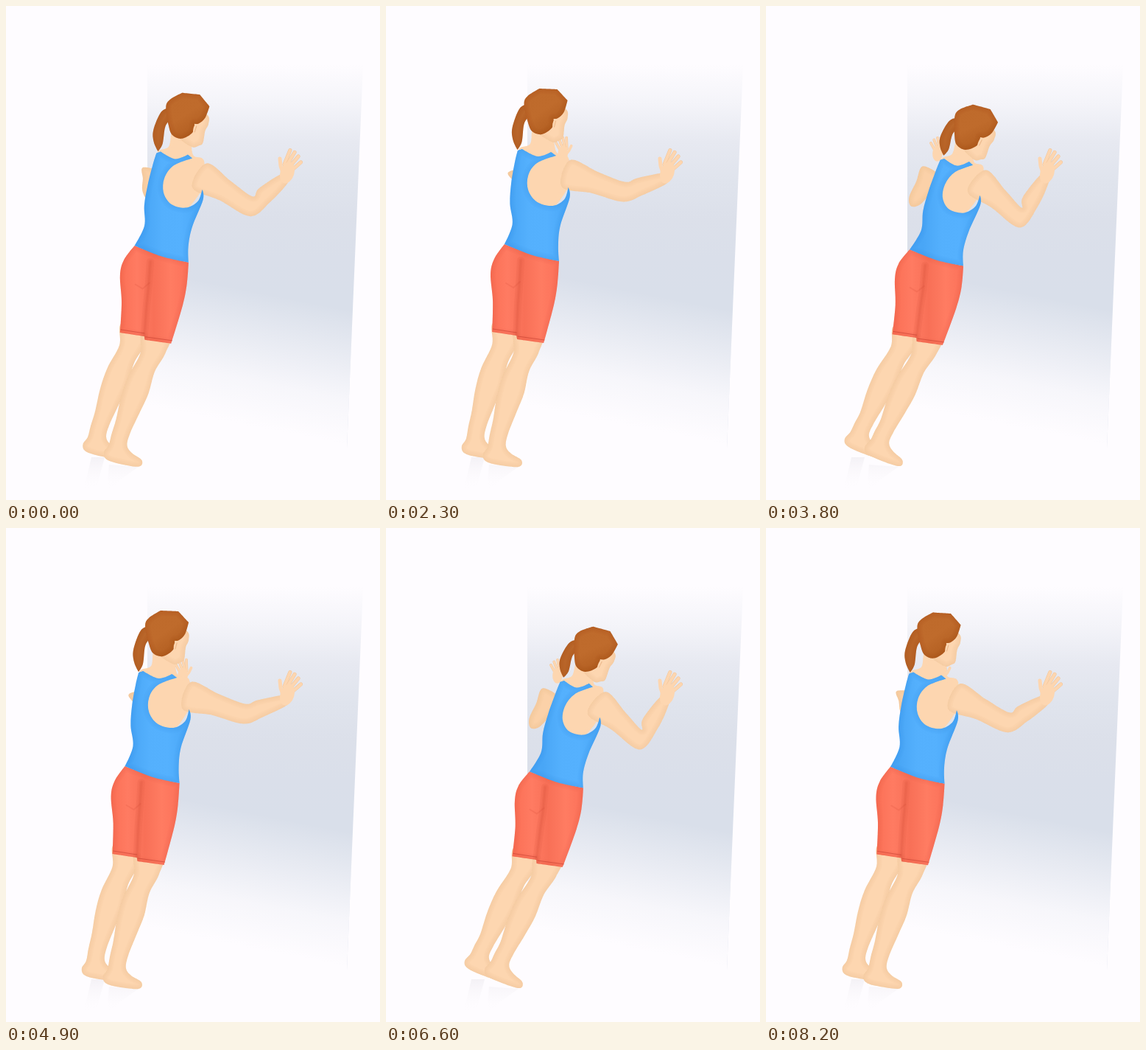
Write an HTML page with a canvas that moves like this. It is 508 by 670 pixels and loops after 8300 ms.

```html
<!DOCTYPE html>
<html lang="en">
<head>
<meta charset="utf-8">
<title>Wall push-up</title>
<style>
html, body { margin: 0; width: 100%; height: 100%; overflow: hidden; background: #fefcff; }
canvas { display: block; }
</style>
</head>
<body>
<canvas id="stage" width="508" height="670"></canvas>
<script>
const ctx = document.getElementById('stage').getContext('2d');
const LOOP = 8300, STEP = 100, CYCLE = LOOP / 3;
const SKIN = '#fdd6b0', SKIN_SHADE = '#d99a68', HAIR_SHADE = '#8d430d';

const clamp = v => Math.min(1, Math.max(0, v));
const mix = (a, b, t) => a + (b - a) * t;

// One push-up as [ms, lean]: 0 = arms extended, 1 = closest to the wall.
const KEYS = [[-417, -.04], [-100, .24], [0, .42], [233, .64], [1050, 1], [1500, .56], [1800, .14], [2350, -.04]];

function leanAt(time) {
  const start = KEYS[0][0], phase = (time - start) % CYCLE + start;
  let i = 0;
  while (i < KEYS.length - 2 && phase > KEYS[i + 1][0]) i++;
  const slope = k => {
    const a = KEYS[k - 1], b = KEYS[k + 1];
    return a && b ? (b[1] - a[1]) / (b[0] - a[0]) : 0;
  };
  const [t0, v0] = KEYS[i], [t1, v1] = KEYS[i + 1];
  const d = t1 - t0, s = clamp((phase - t0) / d), r = 1 - s;
  return v0 * r * r * (1 + 2 * s) + v1 * s * s * (3 - 2 * s)
    + d * s * r * (slope(i) * r - slope(i + 1) * s);
}

// How far the body travels at full lean, by height: [y, dx, dy].
const TRAVEL = [[110, 66, 20], [195, 54, 13], [330, 32, 7], [370, 32, 6], [450, 26, 3], [625, 0, 0]];

const drop = u => Math.max(0, u) ** 1.5;

// Moves a point of the upright pose to where the lean takes it.
function leaning(u) {
  return ({ x, y, corner }) => {
    let i = 0;
    while (i < TRAVEL.length - 2 && y > TRAVEL[i + 1][0]) i++;
    const [y0, x0, d0] = TRAVEL[i], [y1, x1, d1] = TRAVEL[i + 1];
    const s = clamp((y - y0) / (y1 - y0));
    const lag = .2 * u * (1 - u) * clamp((y - 250) / 100);
    const turn = .12 * (x - 195) * clamp((300 - y) / 80);
    return { x: x + (mix(x0, x1, s) - turn) * (u - lag), y: y + mix(d0, d1, s) * drop(u), corner };
  };
}

// Outline of the upright pose as "x,y" points; "!" marks a corner.
const shape = text => text.split(' ').map(p => {
  const [x, y] = p.split(',');
  return { x: +x, y: parseFloat(y), corner: y.endsWith('!') };
});

const LEG = shape('176,440 174,470 159,502 151,530 146,560 141,582 138,598 132,608 135,617 150,622 180,625 184,616 170,607 163,597 166,580 178,550 188,525 195,495 208,470 215,440');
const SHORTS = shape('162,323! 200,337 236,346! 234,375 229,405 215,457! 179,452! 178,447! 145,442! 146,400 143,364 148,343');
const TANK = shape('181,196! 177,212 172,240 170,268 173,296 162,323! 200,338 236,346! 235,325 238,298 251,260 249,246! 244,262 228,271 207,266 195,250 195,230 207,213 233,203! 226,198! 208,204 187,194!');
const TORSO = shape('203,165 198,187 182,196 190,230 193,256 225,275 249,246! 250,207 234,199 227,178');
const FACE = shape('206,165 227,184 238,182 243,178 245,162 249,152 247,140 225,130');
const HAIR = shape('190,133 195,122 211,112! 235,113! 249,128! 244,144 236,152 230,153! 228,165 214,174 201,170 195,157');
const PONYTAIL = shape('197,134 184,139 174,165 175,182 181,195! 187,184 190,160 198,146');

function outline(points) {
  const path = new Path2D(), n = points.length;
  const at = i => points[(i + n) % n];
  const tangent = i => at(i).corner ? { x: 0, y: 0 }
    : { x: (at(i + 1).x - at(i - 1).x) / 6, y: (at(i + 1).y - at(i - 1).y) / 6 };
  path.moveTo(points[0].x, points[0].y);
  for (let i = 0; i < n; i++) {
    const p = at(i), q = at(i + 1), a = tangent(i), b = tangent(i + 1);
    path.bezierCurveTo(p.x + a.x, p.y + a.y, q.x - b.x, q.y - b.y, q.x, q.y);
  }
  path.closePath();
  return path;
}

function gradient(x0, y0, x1, y1, ...colors) {
  const g = ctx.createLinearGradient(x0, y0, x1, y1);
  colors.forEach((color, i) => g.addColorStop(i / (colors.length - 1), color));
  return g;
}

// Fills an outline and darkens its rim from the inside.
function solid(points, fill, shade) {
  const path = outline(points);
  ctx.save();
  ctx.fillStyle = fill;
  ctx.fill(path);
  ctx.clip(path);
  ctx.strokeStyle = shade;
  ctx.globalAlpha = .055;
  for (let width = 2; width < 15; width += 4) {
    ctx.lineWidth = width;
    ctx.stroke(path);
  }
  ctx.restore();
  return path;
}

function line(color, width, ...points) {
  ctx.strokeStyle = color;
  ctx.lineWidth = width;
  ctx.lineCap = ctx.lineJoin = 'round';
  ctx.beginPath();
  points.forEach(p => ctx.lineTo(p.x, p.y));
  ctx.stroke();
}

// Outline around a chain of joints, each with its own radius.
function limb(joints) {
  const sides = joints.map((p, i) => {
    const a = joints[Math.max(0, i - 1)], b = joints[Math.min(joints.length - 1, i + 1)];
    const angle = Math.atan2(b.y - a.y, b.x - a.x);
    const around = turn => ({ x: p.x + p.r * Math.cos(angle + turn), y: p.y + p.r * Math.sin(angle + turn) });
    return { left: around(-Math.PI / 2), right: around(Math.PI / 2), tip: around(0) };
  });
  return [...sides.map(s => s.left), sides[sides.length - 1].tip, ...sides.map(s => s.right).reverse()];
}

function joint(x0, y0, x1, y1, r, u) {
  return { x: mix(x0, x1, u), y: mix(y0, y1, drop(u)), r };
}

const between = (a, b, t, r) => ({ x: mix(a.x, b.x, t), y: mix(a.y, b.y, t), r });

function room() {
  ctx.fillStyle = '#fefcff';
  ctx.fillRect(0, 0, 508, 670);
  const wall = new Path2D('M192 80H485L463 600H192Z');
  ctx.fillStyle = gradient(0, 80, 0, 392, '#fefcff', '#f4f4f9', '#e7e9f1', '#e0e4ed', '#dce0ea', '#dadfea', '#d9dfea');
  ctx.fill(wall);
  ctx.fillStyle = gradient(330, 385, 295, 562, 'rgba(254,252,255,0)', 'rgba(254,252,255,.4)', 'rgba(254,252,255,.8)', '#fefcff');
  ctx.fill(wall);
  ctx.fillStyle = gradient(0, 612, 0, 656, 'rgba(225,221,228,.35)', 'rgba(254,252,255,0)');
  ctx.fill(new Path2D('M116 612L134 612L124 650L106 655ZM140 622L180 625L156 642L136 660Z'));
}

// Palm, thumb and a fan of four fingers; size < 0 mirrors it.
function hand(x, y, size, turn) {
  ctx.save();
  ctx.translate(x, y);
  ctx.rotate(turn);
  ctx.scale(size, Math.abs(size));
  for (let i = 0; i < 4; i++) {
    const angle = (-68 + 9 * i) * Math.PI / 180, length = 21 - .6 * i * i;
    const base = { x: -4 + 3.6 * i, y: -11 + .8 * i * i };
    const tip = { x: base.x + length * Math.cos(angle), y: base.y + length * Math.sin(angle) };
    line('#f2c598', 5, base, tip);
    line(SKIN, 4, base, tip);
  }
  line(SKIN, 5, { x: -6, y: 0 }, { x: -9, y: -9 }, { x: -10, y: -19 });
  ctx.fillStyle = SKIN;
  ctx.beginPath();
  ctx.ellipse(0, 0, 9.5, 15, .3, 0, 7);
  ctx.fill();
  ctx.restore();
}

function leg(dx, dy, u) {
  const at = leaning(u);
  const points = LEG.map(p => {
    const lift = 11 * clamp((184 - p.x) / 48) * clamp((p.y - 560) / 40) * drop(u);
    const q = at({ x: p.x + dx, y: p.y + dy });
    return { x: q.x, y: q.y - lift };
  });
  solid(points, SKIN, SKIN_SHADE);
}

function farArm(u) {
  const shoulder = joint(184, 222, 227, 226, 16, u), elbow = joint(188, 248, 202, 264, 9, u);
  solid(limb([shoulder, between(shoulder, elbow, .5, 12.5), elbow]), '#fbd1a8', SKIN_SHADE);
}

function nearArm(u) {
  const shoulder = joint(246, 227, 286, 237, 19, u);
  const elbow = joint(324, 252, 346, 287, 13.5, u);
  elbow.y += 42 * Math.max(0, u * (1 - u));
  const wrist = { x: 378, y: 234, r: 7.5 };
  const chain = [shoulder, between(shoulder, elbow, .5, 15), elbow, between(elbow, wrist, .4, 12), wrist];
  solid(limb(chain), SKIN, SKIN_SHADE);
  hand(382, 226, 1, 0);
}

function drawShorts(u) {
  const at = leaning(u), points = SHORTS.map(at);
  const left = at({ x: 143, y: 370 }).x;
  const path = solid(points, gradient(left, 0, left + 92, 0, '#fb7056', '#ff7b62', '#f87057', '#ff7c62', '#fc725a'), '#d04a34');
  const trail = text => shape(text).map(at);
  ctx.save();
  ctx.clip(path);
  for (const width of [1.5, 5, 10])
    line('rgba(190,55,38,.09)', width, ...trail('184,345 182,378 180,405 178,450'));
  line('rgba(190,55,38,.12)', 2, ...trail('164,376 174,382 183,374'));
  ctx.restore();
  line('rgba(180,48,36,.45)', 1, ...trail('146,438 178,443'));
  line('rgba(180,48,36,.45)', 1, ...trail('180,448 216,453'));
}

function drawTank(u) {
  const at = leaning(u), left = at({ x: 170, y: 270 }).x;
  solid(TANK.map(at), gradient(left, 0, left + 75, 0, '#49a6f6', '#54b0fd', '#55b1fe', '#4ba8f8'), '#2a82d8');
}

function drawHead(u) {
  const fall = drop(u);
  ctx.save();
  ctx.translate(220 + 63 * u, 145 + 23 * fall);
  ctx.rotate(.22 * fall);
  ctx.translate(-220, -145);
  solid(FACE, SKIN, SKIN_SHADE);

  // The ponytail keeps hanging while the head tips.
  ctx.save();
  ctx.translate(197, 138);
  ctx.rotate(-.12 * fall);
  ctx.scale(1, 1 - .15 * fall);
  ctx.translate(-197, -138);
  solid(PONYTAIL, '#ba672a', HAIR_SHADE);
  ctx.restore();

  solid(HAIR, gradient(195, 115, 235, 170, '#be6a2b', '#bf6b2c', '#b05c1f'), HAIR_SHADE);
  ctx.fillStyle = SKIN;
  ctx.beginPath();
  ctx.ellipse(232, 160, 3.2, 7, .2, 0, 7);
  ctx.fill();
  line('rgba(210,145,90,.45)', 1, { x: 233, y: 156 }, { x: 231, y: 164 });
  ctx.restore();
}

function render(time) {
  const u = leanAt(time);
  room();
  hand(mix(240, 233, u), 200, -.72, .35);
  leg(-29, -11, u);
  leg(0, 0, u);
  drawShorts(u);
  farArm(u);
  solid(TORSO.map(leaning(u)), SKIN, SKIN);
  nearArm(u);
  drawTank(u);
  drawHead(u);
}

const origin = performance.now();
function tick() {
  const elapsed = (performance.now() - origin) % LOOP;
  render(Math.floor(elapsed / STEP) * STEP);
  requestAnimationFrame(tick);
}
tick();
</script>
</body>
</html>
```
